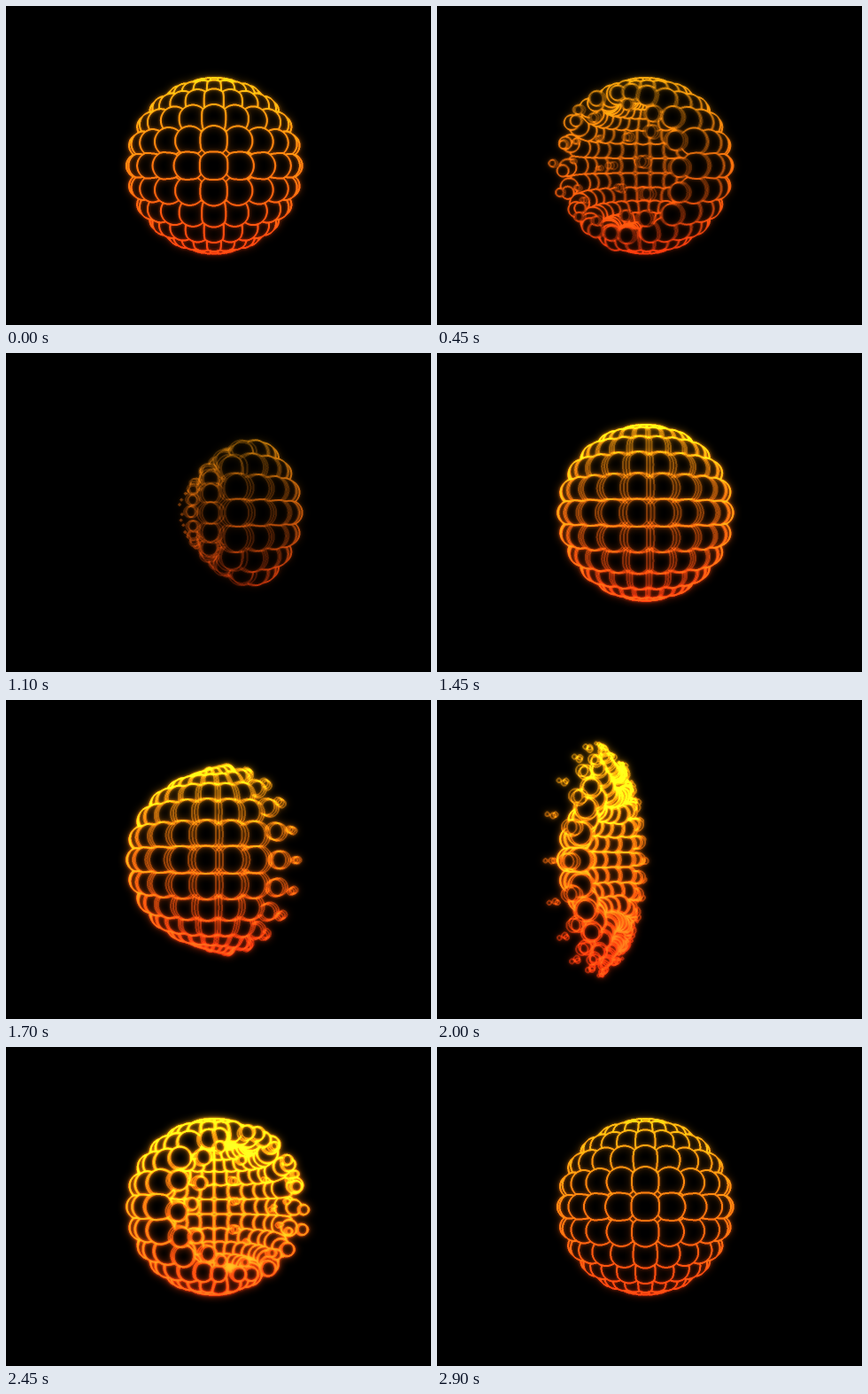
Recreate the animation shown at these times as an HTML page with a canvas. Size 480x360 px, loop 2950 ms.

```html
<!DOCTYPE html>
<html>
<head>
<meta charset="utf-8">
<style>
html, body { margin: 0; width: 100%; height: 100%; overflow: hidden; background: #000; }
canvas { display: block; }
</style>
</head>
<body>
<canvas id="stage" width="480" height="360"></canvas>
<script>
const LOOP = 2950, STEP = 50, W = 960, H = 720;
const CX = 235, CY = 180, RADIUS = 83, BALL = 12.8, CAMERA = 332, SEGMENTS = 24;
const BLUR_TIMES = [-11, 0, 11];
const stage = document.getElementById('stage').getContext('2d');
const layer = document.createElement('canvas');
layer.width = W;
layer.height = H;
const lines = layer.getContext('2d');
const image = lines.createImageData(W, H);
const depth = new Float32Array(W * H), owner = new Uint16Array(W * H), light = new Float32Array(W * H);

// Key times and the values each property has there
const times = [0, 450, 1100, 1450, 2000, 2450, 2900];
const keys = {
  edge:   [1.4, 0.74, -0.3, 0.25, -0.18, 0.72, 1.4],
  angle:  [0, 32, 120, 182, 285, 330, 360],
  spread: [10, 20, -60, 10, 50, 18, 10],
  drift:  [0, 0, 30, 0, -70, 0, 0],
  jitter: [0, 10, 2, 0, 3, 12, 0],
  glow:   [1, 0.85, 0.72, 1.2, 1.4, 1.5, 1]
};

const clamp = v => Math.max(0, Math.min(1, v));
const mix = (a, b, f) => a + (b - a) * f;
const noise = n => { const v = Math.sin(n * 12.9898) * 43758.5453; return (v - Math.floor(v)) * 2 - 1; };

function value(name, t) {
  let i = 0;
  while (i < times.length - 2 && t > times[i + 1]) i++;
  return mix(keys[name][i], keys[name][i + 1], clamp((t - times[i]) / (times[i + 1] - times[i])));
}

function fillBall(id, x, y, z, r) {
  const scale = CAMERA / (CAMERA - z);
  const px = (CX + x * scale) * 2, py = (CY - y * scale) * 2, pr = r * scale * 2;
  const near = -Math.hypot(x, y, CAMERA - z);
  const top = Math.max(0, Math.ceil(py - pr)), bottom = Math.min(H - 1, py + pr);
  for (let j = top; j <= bottom; j++) {
    const dy = j - py, half = Math.sqrt(Math.max(0, pr * pr - dy * dy));
    const right = Math.min(W - 1, px + half);
    for (let i = Math.max(0, Math.ceil(px - half)); i <= right; i++) {
      const k = j * W + i;
      if (depth[k] >= near + r) continue;
      const dx = i - px;
      const d = near + r * Math.sqrt(Math.max(0, 1 - (dx * dx + dy * dy) / (pr * pr)));
      if (d > depth[k]) { depth[k] = d; owner[k] = id; }
    }
  }
}

function placeBalls(t) {
  const u = clamp((t + STEP) / LOOP), turn = u * u * (3 - 2 * u) * Math.PI * 2;
  const angle = value('angle', t) * Math.PI / 180, dirX = -Math.sin(angle), dirZ = Math.cos(angle);
  const edge = value('edge', t), spread = value('spread', t);
  const drift = value('drift', t), jitter = value('jitter', t);
  let id = 0;
  for (let row = -6; row <= 6; row++) {
    const lat = row * Math.PI / 12, count = Math.abs(row) === 6 ? 1 : SEGMENTS;
    for (let col = 0; col < count; col++) {
      id++;
      const lon = col * Math.PI * 2 / SEGMENTS - turn;
      const nx = Math.cos(lat) * Math.sin(lon), ny = Math.sin(lat), nz = Math.cos(lat) * Math.cos(lon);
      const fade = clamp((nx * dirX + nz * dirZ - edge) / 0.7 + 0.5);
      const size = BALL * (1 - fade);
      if (size < 0.6) continue;
      const reach = RADIUS + spread * fade, push = drift * fade * fade, shake = jitter * fade;
      fillBall(id, nx * reach + dirX * push + shake * noise(id),
        ny * reach + shake * noise(id + 400), nz * reach + dirZ * push, size);
    }
  }
}

// Adds a line wherever two neighbouring balls meet
function addOutlines(amount) {
  for (let j = 50; j < H - 50; j++) {
    for (let i = 220; i < W - 200; i++) {
      const k = j * W + i, o = owner[k];
      if (o !== owner[k - 2] || o !== owner[k + 2] || o !== owner[k - 2 * W] || o !== owner[k + 2 * W]) {
        light[k] += amount;
      }
    }
  }
}

function render(t) {
  light.fill(0);
  for (const offset of BLUR_TIMES) {
    depth.fill(-1e9);
    owner.fill(0);
    placeBalls(t + offset);
    addOutlines(1 / BLUR_TIMES.length);
  }
  const glow = value('glow', t), data = image.data;
  for (let j = 0, k = 0; j < H; j++) {
    const green = mix(170, 58, clamp((j / 2 - 80) / 200));
    for (let i = 0; i < W; i++, k++) {
      data[k * 4] = 255;
      data[k * 4 + 1] = green;
      data[k * 4 + 2] = 14;
      data[k * 4 + 3] = 255 * Math.min(1, light[k] * glow * 0.8);
    }
  }
  lines.putImageData(image, 0, 0);
  stage.globalCompositeOperation = 'source-over';
  stage.globalAlpha = 1;
  stage.fillStyle = '#000';
  stage.fillRect(0, 0, 480, 360);
  stage.globalCompositeOperation = 'lighter';
  for (const [blur, alpha] of [[0, 0.9], [1.5, 0.65], [4, 0.65]]) {
    stage.filter = blur ? `blur(${blur}px)` : 'none';
    stage.globalAlpha = Math.min(1, blur ? alpha * glow : alpha);
    stage.drawImage(layer, 0, 0, 480, 360);
  }
  stage.filter = 'none';
}

const start = performance.now();
let shown = -1;
function tick() {
  const t = Math.floor((performance.now() - start) % LOOP / STEP) * STEP;
  if (t !== shown) render(shown = t);
  requestAnimationFrame(tick);
}
tick();
</script>
</body>
</html>
```
